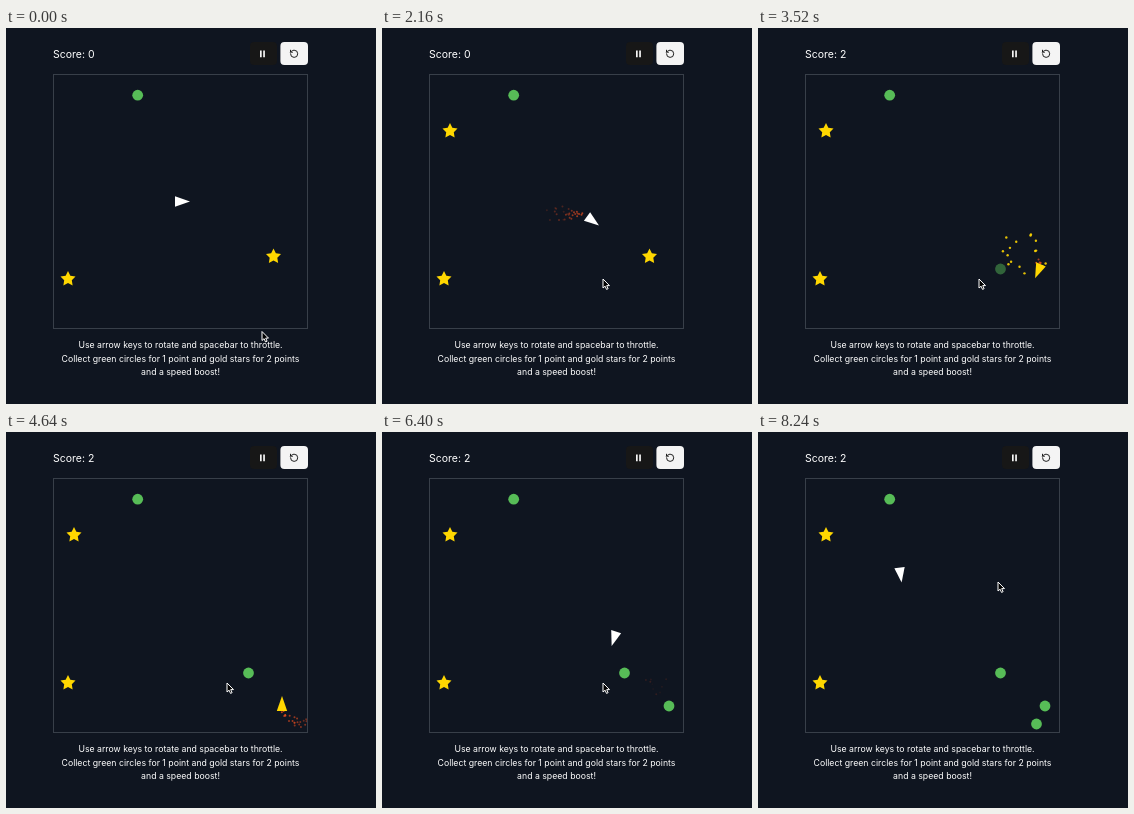
These frames come from a looping animation (370x376 px, 8320 ms). An HTML page with a canvas:

```html
<!DOCTYPE html>
<html lang="en">
<head>
<meta charset="utf-8">
<title>Star pilot</title>
<style>
  html, body { margin: 0; width: 100%; height: 100%; overflow: hidden; background: #0f1520; }
  svg, canvas { position: absolute; left: 0; top: 0; width: 370px; height: 376px; }
  text { font-family: Inter, Roboto, sans-serif; fill: #fff; }
  .help { font-size: 8.73px; text-anchor: middle; }
</style>
</head>
<body>
<svg viewBox="0 0 370 376">
  <text id="score" x="47" y="30" font-size="10.5">Score: 0</text>
  <rect x="244" y="14" width="27" height="23" rx="4" fill="#171717"/>
  <rect x="274.4" y="14" width="27.6" height="23" rx="4" fill="#f4f4f4"/>
  <path d="M254 22.6h1.7v6.6h-1.7zM257.2 22.6h1.7v6.6h-1.7z" fill="#f4f4f4"/>
  <g transform="translate(283.3 21) scale(.4)" fill="none" stroke="#171717" stroke-width="2.4" stroke-linecap="round">
    <path d="M3 12a9 9 0 1 0 9-9 9.75 9.75 0 0 0-6.74 2.74L3 8M3 3v5h5"/>
  </g>
  <rect x="47.5" y="46.5" width="254" height="254" fill="none" stroke="#383f49"/>
  <g class="help">
    <text x="174.5" y="320.2">Use arrow keys to rotate and spacebar to throttle.</text>
    <text x="174.5" y="333.8">Collect green circles for 1 point and gold stars for 2 points</text>
    <text x="174.5" y="347.4">and a speed boost!</text>
  </g>
</svg>
<canvas></canvas>
<script>
const LOOP = 8320, STEP = 80, FADE = 1000;
const HIT = 3040, BOOST_END = 6080;
const TURN_RATE = 0.155, BURN = 280, SPARK_LIFE = 900;
const GOLD = '#ffd700', GREEN = '#57bc57';

// waypoints of the flight
const path = [
  { t: 1280, x: 174, y: 173.5 }, { t: 2160, x: 209, y: 191.5 },
  { t: 3520, x: 281, y: 241 }, { t: 4160, x: 295, y: 277 },
  { t: 4640, x: 276, y: 274 }, { t: 5760, x: 261, y: 234 },
  { t: 7200, x: 190.7, y: 168.5 }, { t: LOOP, x: 138.5, y: 138.5 }
];
// key presses: start of each turn with its degrees, start of each burn
const turns = [[400, 37], [2880, 76], [3560, 157], [4800, -85], [5900, -103]];
const burns = [1440, 1800, 3420, 4140, 4400, 5440, 6620];

const stars = [
  { x: 62, y: 251 }, { x: 267.5, y: 228.5, gone: HIT }, { x: 68, y: 103, born: 1120 }
];
const circles = [
  { x: 131.7, y: 67.2 }, { x: 242.5, y: 241, born: HIT },
  { x: 287, y: 274, born: 5280 }, { x: 278.5, y: 292, born: 6920 }
];

const canvas = document.querySelector('canvas');
const ctx = canvas.getContext('2d');
const scoreText = document.getElementById('score');
const ratio = Math.max(1, devicePixelRatio || 1);
canvas.width = 370 * ratio;
canvas.height = 376 * ratio;

const clamp = v => Math.min(1, Math.max(0, v));
const random = n => { const s = Math.sin(n * 127.1) * 43758.5453; return s - Math.floor(s); };
const opacity = (item, t) => clamp((t - (item.born ?? -FADE)) / FADE);

// cubic curve through the waypoints
function along(t, axis) {
  const last = path.length - 1;
  let i = 0;
  while (i < last - 1 && t >= path[i + 1].t) i++;
  const slope = k => {
    const a = path[Math.max(0, k - 1)], b = path[Math.min(last, k + 1)];
    return (b[axis] - a[axis]) / (b.t - a.t);
  };
  const p = path[i], q = path[i + 1], d = q.t - p.t;
  const u = clamp((t - p.t) / d), v = 1 - u;
  return v * v * (1 + 2 * u) * p[axis] + u * u * (3 - 2 * u) * q[axis]
    + d * u * v * (v * slope(i) - u * slope(i + 1));
}

function heading(t) {
  const degrees = turns.reduce((sum, [start, angle]) =>
    sum + angle * clamp((t - start) * TURN_RATE / Math.abs(angle)), 0);
  return degrees * Math.PI / 180;
}

const shipAt = t => ({ x: along(t, 'x'), y: along(t, 'y'), a: heading(t) });

function dot(x, y, r, color, alpha) {
  ctx.globalAlpha = alpha;
  ctx.fillStyle = color;
  ctx.beginPath();
  ctx.arc(x, y, r, 0, 7);
  ctx.fill();
  ctx.globalAlpha = 1;
}

function star(x, y, alpha) {
  ctx.globalAlpha = alpha;
  ctx.fillStyle = GOLD;
  ctx.beginPath();
  for (let i = 0; i < 10; i++) {
    const r = i % 2 ? 4 : 7.9, a = i * Math.PI / 5 - Math.PI / 2;
    ctx.lineTo(x + r * Math.cos(a), y + r * Math.sin(a));
  }
  ctx.fill();
  ctx.globalAlpha = 1;
}

function exhaust(t) {
  for (const start of burns) {
    for (let born = start; born < Math.min(start + BURN, t); born += 20) {
      const age = (t - born) / SPARK_LIFE;
      if (age > 1) continue;
      const s = shipAt(born), back = 5 + 7 * age, spread = 2 + 24 * age;
      const x = s.x - back * Math.cos(s.a) + (random(born) - 0.5) * spread;
      const y = s.y - back * Math.sin(s.a) + (random(born + 0.5) - 0.5) * spread + 19 * age;
      dot(x, y, 1, '#dc4a20', 0.85 * (1 - age));
    }
  }
}

// ring of gold sparks flung from the collected star
function burst(t) {
  const age = (t - HIT) / FADE;
  if (age < 0 || age > 1) return;
  for (let i = 0; i < 16; i++) {
    const a = i * Math.PI / 8 + random(i), r = age * (20 + 34 * random(i + 40));
    dot(267 + r * Math.cos(a), 223 + r * Math.sin(a), 1.2, GOLD, 1 - age ** 3);
  }
}

function ship(t) {
  const s = shipAt(t);
  ctx.save();
  ctx.translate(s.x, s.y);
  ctx.rotate(s.a);
  ctx.fillStyle = t >= HIT && t < BOOST_END ? GOLD : '#fff';
  ctx.fill(new Path2D('M10 0L-5 5.2V-5.2z'));
  ctx.restore();
}

function cursor(t) {
  const first = clamp((t - 800) / 720), second = clamp((t - 7600) / 560);
  const arrow = new Path2D('M.5 0V9L2.6 7.2L4 10.4L5.6 9.7L4.2 6.6H7z');
  ctx.save();
  ctx.translate(255.5 - 35 * first + 19 * second, 303.5 - 52.5 * first - 101 * second);
  ctx.fillStyle = '#000';
  ctx.strokeStyle = '#fff';
  ctx.fill(arrow);
  ctx.stroke(arrow);
  ctx.restore();
}

function draw(t) {
  ctx.setTransform(ratio, 0, 0, ratio, 0, 0);
  ctx.clearRect(0, 0, 370, 376);
  scoreText.textContent = 'Score: ' + (t < HIT ? 0 : 2);

  ctx.save();
  ctx.beginPath();
  ctx.rect(48, 47, 253, 253);
  ctx.clip();
  for (const c of circles) dot(c.x, c.y, 5.4, GREEN, opacity(c, t));
  for (const s of stars) if (t < (s.gone ?? LOOP)) star(s.x, s.y, opacity(s, t));
  exhaust(t);
  burst(t);
  ship(t);
  ctx.restore();
  cursor(t);
}

const begin = performance.now();
function frame() {
  const t = (performance.now() - begin) % LOOP;
  draw(Math.floor(t / STEP) * STEP);
  requestAnimationFrame(frame);
}
frame();
</script>
</body>
</html>
```
